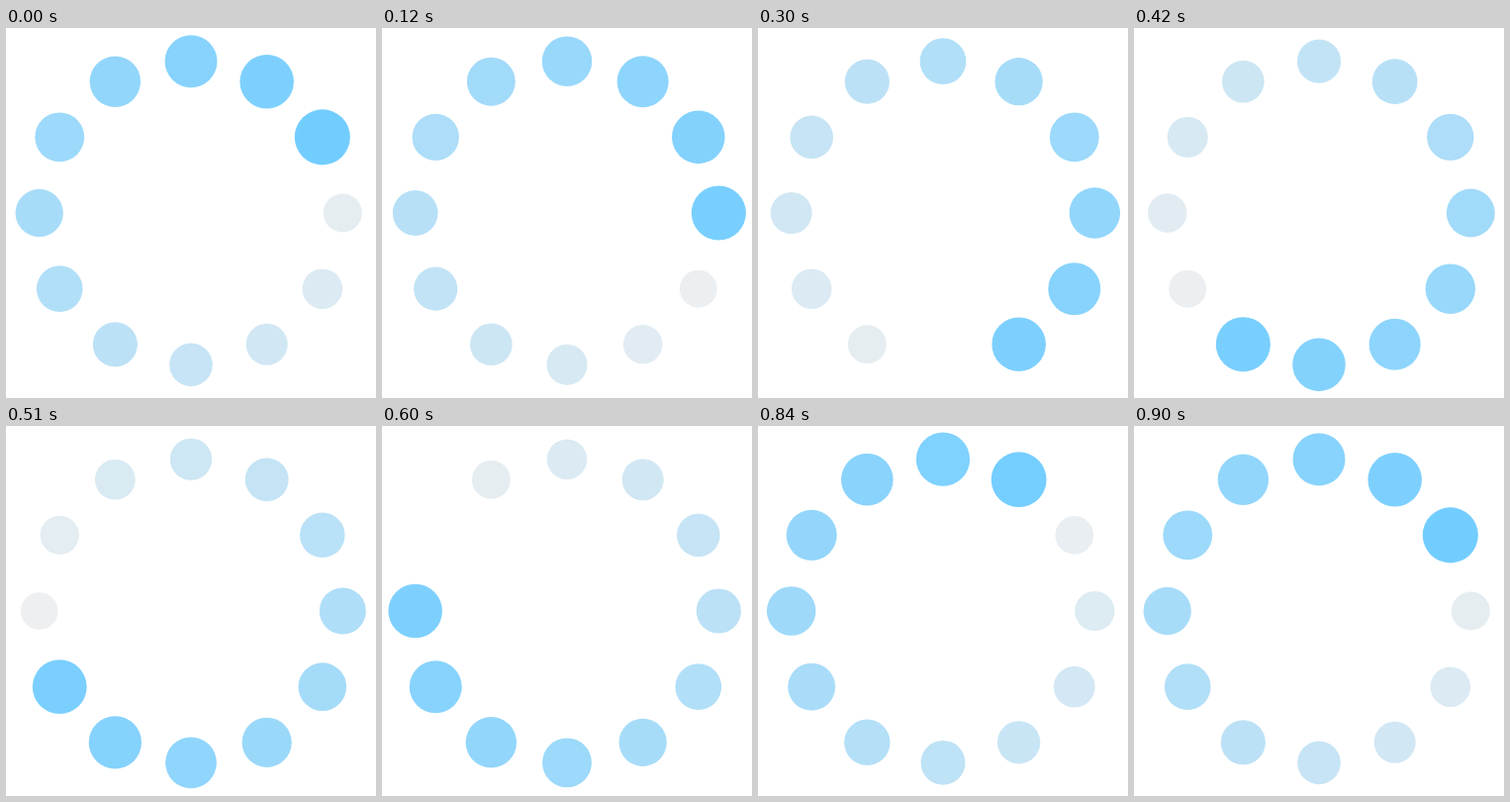
An HTML page with a canvas for the animation above (0.93 s loop, 374 px wide and 374 px high).

```html
<!DOCTYPE html>
<html lang="en">
<head>
<meta charset="utf-8">
<title>Dot spinner</title>
<style>
  html, body { margin: 0; width: 100%; height: 100%; overflow: hidden; background: #fff; }
  canvas { display: block; width: 374px; height: 374px; }
</style>
</head>
<body>
<canvas id="stage" width="374" height="374"></canvas>
<script>
const ctx = document.getElementById("stage").getContext("2d");
const SIZE = 374;
const CENTER = SIZE / 2;
const UNIT = SIZE / 100;
const DOTS = 12;
const RING = 41 * UNIT;
const TICK_MS = 30;
const TICKS = 31;
const CYCLE = 60; // one dot's life, in half ticks
const FRESH = [114, 205, 255];
const FADED = [240, 240, 240];

const mix = (a, b, p) => a + (b - a) * p;

function drawDot(index, age) {
  const angle = index / DOTS * Math.PI * 2;
  const rgb = FRESH.map((c, k) => Math.round(mix(c, FADED[k], age)));
  ctx.fillStyle = `rgb(${rgb})`;
  ctx.beginPath();
  ctx.arc(
    CENTER + RING * Math.cos(angle),
    CENTER + RING * Math.sin(angle),
    mix(7.5, 5, age) * UNIT, 0, Math.PI * 2);
  ctx.fill();
}

function draw(now) {
  const tick = Math.floor(now / TICK_MS) % TICKS;
  ctx.fillStyle = "#fff";
  ctx.fillRect(0, 0, SIZE, SIZE);
  for (let i = 0; i < DOTS; i++) {
    const age = (2 * tick - 5 * (i + 1) + 2 * CYCLE) % CYCLE;
    // A dot blinks out at the exact moment it restarts, except the last one.
    if (age === 0 && i !== DOTS - 1) continue;
    drawDot(i, age / CYCLE);
  }
}

const start = performance.now();
function loop() {
  draw(performance.now() - start);
  requestAnimationFrame(loop);
}
loop();
</script>
</body>
</html>
```
